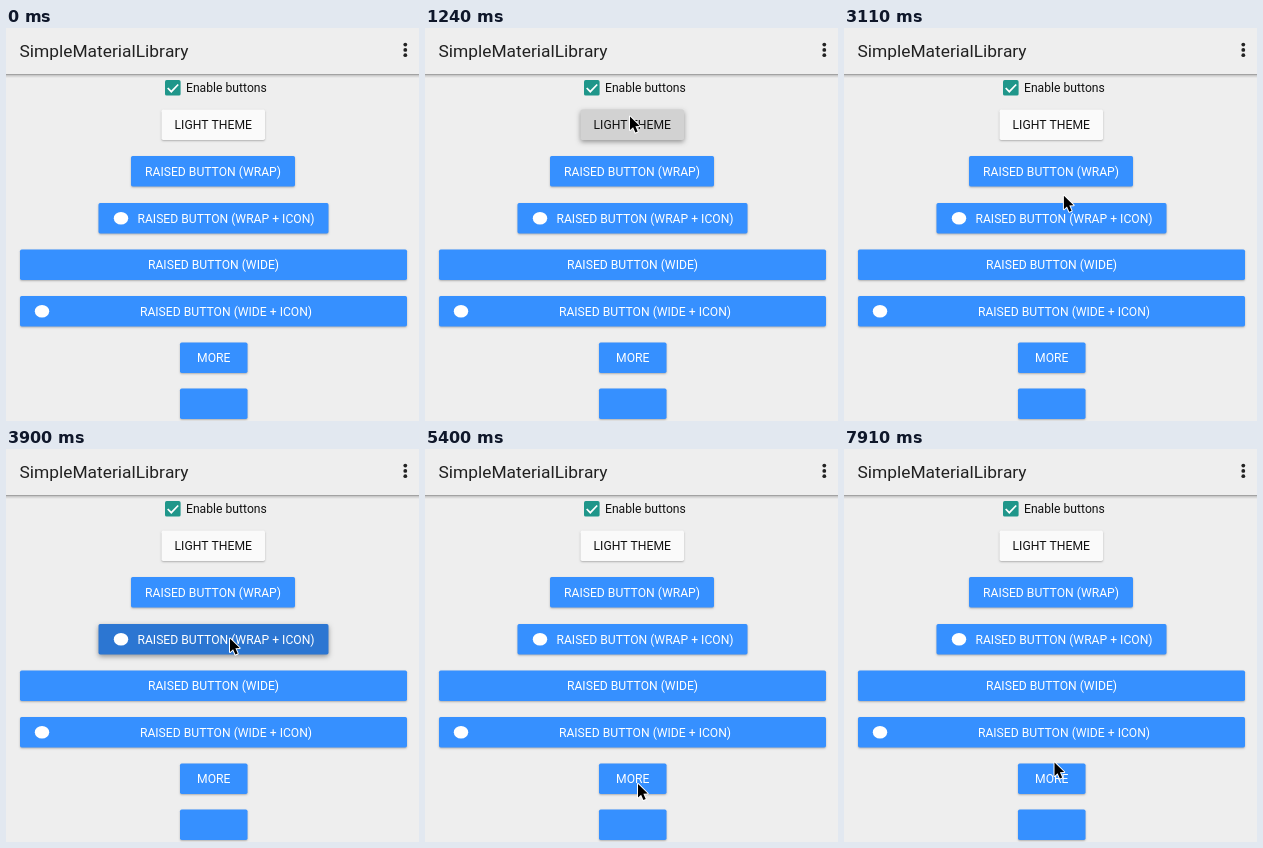
An HTML page with a canvas for the animation above (8000 ms loop, 413 by 393 pixels).

```html
<!DOCTYPE html>
<html lang="en">
<head>
<meta charset="utf-8">
<title>Material buttons</title>
<style>
  html, body { margin: 0; width: 100%; height: 100%; overflow: hidden; background: #eee; }
  canvas { display: block; }
</style>
</head>
<body>
<canvas id="stage" width="413" height="393"></canvas>
<script>
const ctx = document.getElementById('stage').getContext('2d');
const LOOP = 8000;
const STEP = 87.14;   // the pointer is sampled at this interval
const SLACK = 8;
const BLUE = '#3690ff', BLUE_DOWN = '#2c76d2';
const LIGHT = '#fafafa', LIGHT_DOWN = '#d2d2d2';

const buttons = [
  { x: 155.5, y: 81.5, w: 103.5, label: 'LIGHT THEME', light: true, press: [1240, 2230] },
  { x: 125, y: 128, w: 164, label: 'RAISED BUTTON (WRAP)' },
  { x: 92.5, y: 175, w: 230, label: 'RAISED BUTTON (WRAP + ICON)', textX: 220, icon: 115, press: [3900, 4520] },
  { x: 14, y: 221.5, w: 387, label: 'RAISED BUTTON (WIDE)' },
  { x: 14, y: 268, w: 387, label: 'RAISED BUTTON (WIDE + ICON)', textX: 220, icon: 36 },
  { x: 174, y: 314.5, w: 67.5, label: 'MORE', press: [6740, 7550] },
  { x: 174, y: 360.5, w: 67.5, label: '' }
];

// Pointer moves: start time, number of steps, destination
const origin = { x: 288, y: 392 };
const moves = [
  { t: 90, n: 8, x: 205, y: 88.5 },
  { t: 2580, n: 10, x: 224, y: 189.5 },
  { t: 4970, n: 6, x: 213, y: 335 },
  { t: 5490, n: 2, x: 209.3, y: 346 },
  { t: 5760, n: 2, x: 209.3, y: 340.5 },
  { t: 6110, n: 2, x: 210, y: 339.5 },
  { t: 7910, n: 1, x: 210.5, y: 313.5 }
];

const smooth = k => k * k * (3 - 2 * k);

function pointerAt(t) {
  if (t < moves[0].t - SLACK) return null;
  let { x, y } = origin;
  for (const m of moves) {
    const done = Math.floor((t - m.t + SLACK) / STEP) + 1;
    if (done <= 0) break;
    const k = smooth(Math.min(done, m.n) / m.n);
    x += (m.x - x) * k;
    y += (m.y - y) * k;
  }
  return { x, y };
}

function text(str, x, y, size, color, align = 'left') {
  ctx.font = `${size}px Roboto, sans-serif`;
  ctx.fontKerning = 'none';
  ctx.textAlign = align;
  ctx.fillStyle = color;
  ctx.fillText(str, x, y);
}

function box(x, y, w, h, r, color) {
  ctx.beginPath();
  ctx.roundRect(x, y, w, h, r);
  ctx.fillStyle = color;
  ctx.fill();
}

function ellipse(x, y, rx, ry, color) {
  ctx.beginPath();
  ctx.ellipse(x, y, rx, ry, 0, 0, Math.PI * 2);
  ctx.fillStyle = color;
  ctx.fill();
}

function polyline(points, close) {
  ctx.beginPath();
  for (const [x, y] of points) ctx.lineTo(x, y);
  if (close) ctx.closePath();
}

function drawHeader() {
  const shade = ctx.createLinearGradient(0, 46, 0, 50);
  shade.addColorStop(0, 'rgba(0,0,0,0.4)');
  shade.addColorStop(0.4, 'rgba(0,0,0,0.14)');
  shade.addColorStop(1, 'rgba(0,0,0,0)');
  ctx.fillStyle = shade;
  ctx.fillRect(0, 46, 413, 4);
  text('SimpleMaterialLibrary', 13.5, 29, 17.36, '#212121');
  for (const y of [16.6, 21.9, 27.2]) ellipse(399.3, y, 1.9, 1.9, '#222');
}

function drawCheckbox() {
  box(159, 52, 15.6, 15.6, 1.7, '#1f968a');
  polyline([[161.7, 60], [165.3, 63.7], [172.2, 56.5]]);
  ctx.strokeStyle = '#fff';
  ctx.lineWidth = 1.7;
  ctx.stroke();
  text('Enable buttons', 180, 64.3, 12.15, '#111');
}

function drawButton(b, t) {
  const down = b.press && t >= b.press[0] && t < b.press[1];
  const color = b.light ? (down ? LIGHT_DOWN : LIGHT) : (down ? BLUE_DOWN : BLUE);
  ctx.save();
  ctx.shadowColor = down ? 'rgba(0,0,0,0.38)' : 'rgba(0,0,0,0.26)';
  ctx.shadowBlur = down ? 5 : 2;
  ctx.shadowOffsetY = down ? 2 : 1;
  box(b.x, b.y, b.w, 30.5, 1.7, color);
  ctx.restore();
  if (b.icon) ellipse(b.icon, b.y + 15.3, 7.2, 6.3, '#fff');
  text(b.label, b.textX || b.x + b.w / 2, b.y + 19.9, 12.15, b.light ? '#111' : '#fff', 'center');
}

function drawPointer({ x, y }) {
  ctx.save();
  ctx.translate(x, y);
  polyline([[0, 0], [0, 13.6], [3.1, 10.7], [5.4, 16.1], [7.7, 15.1], [5.4, 9.8], [9.7, 9.6]], true);
  ctx.strokeStyle = '#fff';
  ctx.lineWidth = 2;
  ctx.lineJoin = 'round';
  ctx.stroke();
  ctx.fillStyle = '#000';
  ctx.fill();
  ctx.restore();
}

function draw(t) {
  ctx.fillStyle = '#eee';
  ctx.fillRect(0, 0, 413, 393);
  drawHeader();
  drawCheckbox();
  for (const b of buttons) drawButton(b, t);
  const pointer = pointerAt(t);
  if (pointer) drawPointer(pointer);
}

const start = performance.now();
function tick() {
  draw((performance.now() - start) % LOOP);
  requestAnimationFrame(tick);
}
tick();
</script>
</body>
</html>
```
